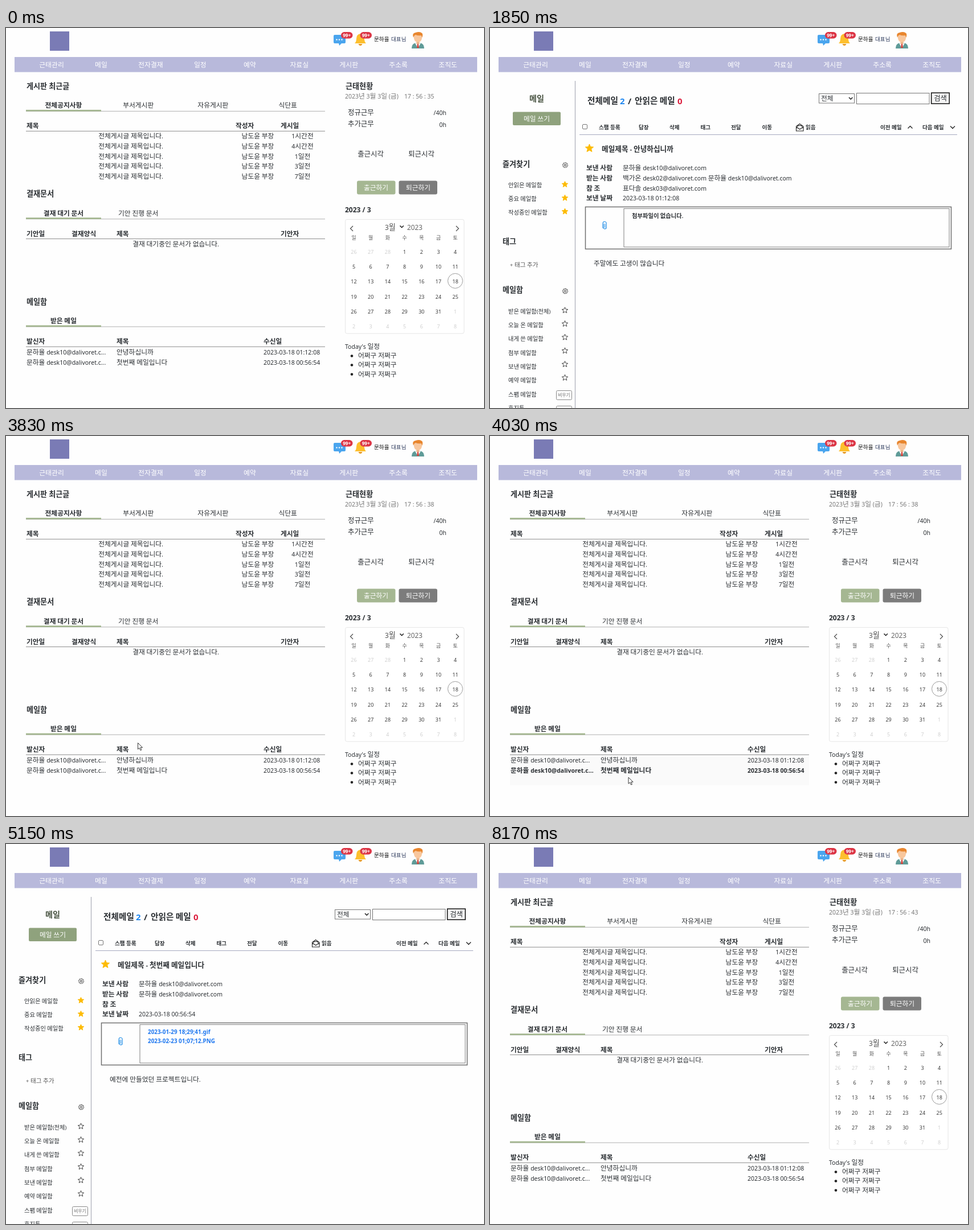
Animation of 839x668 px, one loop 9 s. Source, as an HTML page:

```html
<!DOCTYPE html>
<html lang="ko">
<head>
<meta charset="utf-8">
<title>그룹웨어 메일</title>
<style>
html, body { margin: 0; width: 100%; height: 100%; overflow: hidden; background: #fefefe; }
svg { display: block; width: 839px; height: 668px; }
text { font-family: "Noto Sans", "Noto Sans CJK KR", sans-serif; white-space: pre; }
</style>
</head>
<body>
<svg id="stage" viewBox="0 0 839 668" xmlns="http://www.w3.org/2000/svg"></svg>
<script>
const LOOP = 9000;
const INK = '#2b2f33', GREEN = '#a3b68f', GOLD = '#fdbb05';
const ME = '문하율', MAIL = 'desk10@dalivoret.com';
const stage = document.getElementById('stage');

// Hangul runs are set slightly larger than Latin ones
const hangul = s => s.replace(/[가-힣]+/g, m => `<tspan font-size="1.12em">${m}</tspan>`);

// Text with its vertical centre at y; o: s size, b weight, c colour, a anchor, id
function T(x, y, str, o = {}) {
  const s = o.s || 10.5;
  return `<text x="${x}" y="${y + s * 0.4}" font-size="${s}" font-weight="${o.b || 400}" ` +
    `fill="${o.c || INK}" text-anchor="${o.a || 'start'}"${o.id ? ` id="${o.id}"` : ''}>${hangul(str)}</text>`;
}
const M = (x, y, str, o) => T(x, y, str, { ...o, a: 'middle' });
const B = (x, y, str, o) => T(x, y, str, { ...o, b: 700 });
const rect = (x, y, w, h, fill, rx = 0, stroke = 'none', sw = 1) =>
  `<rect x="${x}" y="${y}" width="${w}" height="${h}" rx="${rx}" fill="${fill}" stroke="${stroke}" stroke-width="${sw}"/>`;
const path = (d, fill = 'none', stroke = 'none', sw = 1, extra = '') =>
  `<path d="${d}" fill="${fill}" stroke="${stroke}" stroke-width="${sw}" ${extra}/>`;
const circle = (x, y, r, fill = 'none', stroke = 'none', sw = 1) =>
  `<circle cx="${x}" cy="${y}" r="${r}" fill="${fill}" stroke="${stroke}" stroke-width="${sw}"/>`;
const rule = (y, c) => path(`M35 ${y}H560`, 'none', c);

function star(x, y, r, fill, stroke) {
  let d = '';
  for (let i = 0; i < 10; i++) {
    const a = Math.PI * (i / 5 - 0.5), q = i % 2 ? r * 0.45 : r;
    d += (i ? 'L' : 'M') + (x + q * Math.cos(a)).toFixed(2) + ' ' + (y + q * Math.sin(a)).toFixed(2);
  }
  return path(d + 'Z', fill, stroke, 1, 'stroke-linejoin="round"');
}
function gear(x, y) {
  let d = '';
  for (let i = 0; i < 32; i++) {
    const a = i * Math.PI / 16, r = i % 4 < 2 ? 4.6 : 3.8;
    d += (i ? 'L' : 'M') + (x + r * Math.cos(a)).toFixed(2) + ' ' + (y + r * Math.sin(a)).toFixed(2);
  }
  return path(d + 'Z', 'none', '#333') + circle(x, y, 1.7, 'none', '#333');
}
const badge = x => rect(x, 7, 20.5, 11.5, '#dc3545', 5.7) + M(x + 10.2, 12.8, '99+', { s: 8.2, b: 700, c: '#fff' });

function header() {
  const menu = ['근태관리', '메일', '전자결재', '일정', '예약', '자료실', '게시판', '주소록', '조직도'];
  return rect(77, 6, 34, 34, '#7a7bb5') +
    path('M577 12h17q2 0 2 2v11q0 2-2 2h-5l-4 4-1-4h-7q-2 0-2-2v-11q0-2 2-2z', '#4aa5ee') +
    [580.5, 585, 589.5].map(x => circle(x, 20.5, 1.2, '#fff')).join('') + badge(588) +
    path('M622 10q7 1 7 9 0 5 3 8h-20q3-3 3-8 0-8 7-9z', '#fdbf2d') +
    path('M618.500 28h7q-1 3-3.500 3t-3.500-3z', '#e8981d') + badge(621.5) +
    T(646, 20, ME, { s: 8.6, b: 500, c: '#111' }) + T(676, 20, '대표님', { s: 8.6, c: '#2d3a5c' }) +
    path('M712 36q0-8 6-9.500h10q6 1.500 6 9.500z', '#5f9b98') +
    path('M718 26.500h10l-5 9z', '#fff') + path('M722 28h2l1 7h-4z', '#d6453d') +
    rect(720.5, 21, 5, 7, '#eeb387') +
    path('M716 14q0-4 7-4t7 4v4q-1 7-7 7t-7-7z', '#f8c79d') +
    path('M715 17q-3-8 4-9 8-3 12 2 1 3-.500 7l-1.500-4q-6 1-10-1-3 1-4 5z', '#e8862e') +
    rect(15, 51, 812, 26.5, '#b8b9db') +
    menu.map((m, i) => M(80 + i * 86.95, 64.3, m, { c: '#fff', s: 10.6 })).join('');
}

// Tab strip whose first tab is active
const tabs = (y, names) => rule(y + 10.5, '#b0b0b0') + rect(35, y + 8, 132, 2.7, GREEN) +
  names.map((n, i) => M(101 + i * 131.2, y, n, { b: i ? 400 : 700 })).join('');
const heads = (y, cols) => cols.map(([x, n]) => B(x, y, n)).join('') + rule(y + 9.3, '#8c8c8c');

function calendar() {
  let s = rect(595.5, 336.5, 208.5, 200.5, '#fff', 3, '#e6e6e6') +
    path('M609 348l-4.500 4.500 4.500 4.500M790 348l4.500 4.500-4.500 4.500', 'none', '#444', 1.1) +
    T(665, 350, '3월', { s: 11.8, b: 300, c: '#555' }) + path('M691.500 347.500l3.200 3.200 3.200-3.200', 'none', '#222', 1.6) +
    T(704, 350, '2023', { s: 11.8, b: 300, c: '#666' });
  const colX = i => 610.5 + i * 29.7;
  [...'일월화수목금토'].forEach((d, i) => s += M(colX(i), 369, d, { s: 8, c: '#555' }));
  for (let i = 0; i < 42; i++) {
    const n = i - 2, inMonth = n > 0 && n < 32;
    const day = n < 1 ? n + 28 : n > 31 ? n - 31 : n;
    s += M(colX(i % 7), 393 + Math.floor(i / 7) * 26.3, '' + day, { s: 9, c: inMonth ? '#3c3c3c' : '#d0d0d0' });
  }
  return s + circle(788.5, 444.5, 13, 'none', '#999');
}

function row(y, id, title, date) {
  return `<g id="${id}">` + T(36, y, ME + ' ' + MAIL.slice(0, -2) + '...') + T(194, y, title) + T(452, y, date) + '</g>';
}
// Same row prepared in bold; only one of the two is shown
const boldRow = (...a) => row(...a).replace(/font-weight="400"/g, 'font-weight="600"');

function home() {
  const ages = ['1시간전', '4시간전', '1일전', '3일전', '7일전'];
  const mail1 = ['안녕하십니까', '2023-03-18 01:12:08'], mail2 = ['첫번째 메일입니다', '2023-03-18 00:56:54'];
  const big = { s: 11.7 }, mid = { s: 11.1, b: 500 };
  return B(36, 102, '게시판 최근글', big) + tabs(135.8, ['전체공지사항', '부서게시판', '자유게시판', '식단표']) +
    heads(172, [[36, '제목'], [403, '작성자'], [482, '게시일']]) +
    ages.map((a, i) => {
      const y = 190 + i * 17.65;
      return M(219, y, '전체게시글 제목입니다.') + M(442, y, '남도윤 부장') + M(520.5, y, a);
    }).join('') +
    B(36, 291.5, '결재문서', big) + tabs(325.3, ['결재 대기 문서', '기안 진행 문서']) +
    heads(361.3, [[36, '기안일'], [115, '결재양식'], [194, '제목'], [482, '기안자']]) +
    M(298, 380, '결재 대기중인 문서가 없습니다.') +
    B(36, 481, '메일함', big) + tabs(514.6, ['받은 메일']) +
    '<g id="panel">' + rect(35, 561, 525, 52.5, '#fafafa') + '</g>' +
    heads(551, [[36, '발신자'], [194, '제목'], [452, '수신일']]) +
    row(570, 'r1', ...mail1) + boldRow(570, 'b1', ...mail1) +
    row(588, 'r2', ...mail2) + boldRow(588, 'b2', ...mail2) +
    B(596, 102, '근태현황', big) + T(595, 120, '2023년 3월 3일 (금)', { c: '#777' }) +
    T(699, 120, '', { c: '#777', id: 'clock' }) +
    T(600, 148.7, '정규근무', mid) + T(773, 149, '/40h', { a: 'end' }) +
    T(600, 169, '추가근무', mid) + T(773, 169.5, '0h', { a: 'end' }) +
    M(640, 222, '출근시각', mid) + M(729, 222, '퇴근시각', mid) +
    rect(616, 268.5, 67.5, 24, '#a5b792', 3) + M(649.5, 281, '출근하기', { c: '#fff' }) +
    rect(689.5, 268.5, 67.5, 24, '#7c7c7c', 3) + M(723.5, 281, '퇴근하기', { c: '#fff' }) +
    B(595, 319.5, '2023 / 3', { s: 12 }) + calendar() +
    T(595, 560, "Today's 일정") +
    [576, 592, 608.3].map(y => circle(607, y + 0.5, 2.3, '#222') + T(618, y, '어쩌구 저쩌구')).join('');
}

function sidebar() {
  const fav = ['안읽은 메일함', '중요 메일함', '작성중인 메일함'];
  const boxes = ['받은 메일함(전체)', '오늘 온 메일함', '내게 쓴 메일함', '첨부 메일함', '보낸 메일함', '예약 메일함', '스팸 메일함', '휴지통'];
  const small = { s: 9.2 }, head = { s: 11.7, b: 600 };
  return path('M149.500 93V668', 'none', '#a9abb8', 1.2) +
    M(82, 124, '메일', { s: 12.6, b: 600, c: '#46513f' }) +
    rect(40, 147.5, 84, 23.5, '#8fa27d', 2) + M(82, 159.3, '메일 쓰기', { c: '#fff' }) +
    T(22, 239, '즐겨찾기', head) + gear(132, 241) +
    fav.map((n, i) => T(32, 276 + i * 24.4, n, small) + star(131.5, 275 + i * 23.8, 5.5, GOLD, GOLD)).join('') +
    T(22, 375, '태그', head) + T(35, 416, '+ 태그 추가', { s: 9.5, c: '#555' }) +
    T(22, 460, '메일함', head) + gear(132, 462.5) +
    boxes.map((n, i) => T(32, 498 + i * 24.35, n, small) +
      (i < 6 ? star(131.5, 496.3 + i * 23.7, 5.5, 'none', '#444') : '')).join('') +
    [637, 664].map(y => rect(116.5, y + 0.5, 27, 16, '#fff', 2, '#888') + M(130, y + 8.5, '비우기', { s: 6.8, c: '#666' })).join('');
}

function mailPage() {
  const tools = [[191, '스팸 등록'], [261, '답장'], [315, '삭제'], [369.5, '태그'], [423, '전달'], [477.5, '이동'],
    [554, '읽음'], [685, '이전 메일'], [759, '다음 메일']];
  const title = { s: 13.1 };
  return sidebar() +
    B(171, 128, '전체메일', title) + B(228, 128, '2', { s: 15, c: '#1f87f0' }) + B(242, 128, '/', { s: 15 }) +
    B(254, 128, '안읽은 메일', title) + B(329, 128, '0', { s: 15, c: '#dc1e3e' }) +
    rect(577.5, 115.5, 62, 16.5, '#fff', 0, '#767676') + T(581, 123.7, '전체') +
    path('M630 122l3.200 3.200 3.200-3.200', 'none', '#222', 1.6) +
    rect(643.5, 114.5, 127.5, 19, '#fff', 0, '#767676') +
    rect(774.7, 114, 31.5, 19, '#f5f5f5', 0, '#111', 1.5) + M(790.5, 123.7, '검색', { s: 11 }) +
    rect(162.5, 169.5, 8, 8, '#fff', 1.5, '#767676') +
    tools.map(([x, n]) => T(x, 174.5, n, { s: 8.6, b: 600 })).join('') +
    path('M537.500 173l6-4.500 6.500 4.500v8h-12.500zM537.500 174l6.200 4 6.300-4M540 174v-2.500h7.500v2.500', 'none', '#222', 1.1) +
    path('M733.500 176.500l4-4 4 4M808 172.500l4 4 4-4', 'none', '#222', 1.3) +
    path('M157 187.500H820', 'none', '#a5a9c0') +
    star(174.5, 211.5, 7.5, GOLD, GOLD) + B(196, 212, '', { s: 11.3, id: 'subject' }) +
    ['보낸 사람', '받는 사람', '참 조', '보낸 날짜'].map((n, i) =>
      B(169, 246 + i * 17.65, n) + T(233, 246 + i * 17.65, '', { id: 'v' + i })).join('') +
    rect(167.5, 314.5, 642, 74, '#fefefe', 0, '#707070', 1.5) +
    rect(235, 317.5, 571, 67.5, '#fefefe', 0, '#808080') +
    path('M199 344.500v6a2.600 2.600 0 0 0 5.200 0v-7a2 2 0 0 0-6-.500v8.500M201.600 344.500v6', 'none', '#2b93e8', 1.2, 'stroke-linecap="round"') +
    T(249, 330.3, '', { s: 9.2, b: 600, id: 'none' }) +
    B(249, 330, '', { s: 9.9, c: '#1f78f0', id: 'a0' }) + B(249, 346.5, '', { s: 9.9, c: '#1f78f0', id: 'a1' }) +
    T(182, 414, '', { id: 'body' });
}

stage.innerHTML = '<g>' + header() + '</g><g id="home">' + home() + '</g><g id="mail">' + mailPage() + '</g>' +
  '<g id="cursor">' + path('M0 0v11.200l2.600-2.300 1.900 4.200 1.900-.800-1.900-4.100h3.600z', '#fff', '#222', 0.9) + '</g>';

const $ = id => document.getElementById(id);
const show = (id, on) => $(id).setAttribute('display', on ? 'inline' : 'none');

const sender = ME + ' ' + MAIL;
const mails = [
  { subject: '메일제목 - 안녕하십니까', v0: sender, v1: '백가온 desk02@dalivoret.com ' + sender,
    v2: '표다솔 desk03@dalivoret.com', v3: '2023-03-18 01:12:08',
    none: '첨부파일이 없습니다.', a0: '', a1: '', body: '주말에도 고생이 많습니다' },
  { subject: '메일제목 - 첫번째 메일입니다', v0: sender, v1: sender, v2: '', v3: '2023-03-18 00:56:54',
    none: '', a0: '2023-01-29 18;29;41.gif', a1: '2023-02-23 01;07;12.PNG', body: '예전에 만들었던 프로젝트입니다.' }
];

// Pointer tracks: time, x, y; each ends at its last key
const tracks = [
  [[420, 395, 609], [520, 391, 590], [720, 387, 566], [1550, 387, 566], [1750, 300, 150], [1850, 300, 150]],
  [[3530, 190, 380], [3730, 222, 485], [3930, 241, 594], [4030, 243, 600], [4330, 243, 602],
    [4850, 243, 602], [5050, 190, 160], [5150, 190, 160]]
];
const ticks = [1030, 2030, 3030, 4130, 5130, 6130, 7130, 8170];

function pointer(t) {
  const k = tracks.find(k => t >= k[0][0] && t < k[k.length - 1][0]);
  if (!k) return null;
  const q = k[0][0] + Math.floor((t - k[0][0]) / 100) * 100;
  const i = k.findIndex((p, n) => q >= p[0] && q < k[n + 1][0]);
  const [a, b] = [k[i], k[i + 1]], f = (q - a[0]) / (b[0] - a[0]);
  return [a[1] + (b[1] - a[1]) * f, a[2] + (b[2] - a[2]) * f];
}

let openMail = -1;
function draw(t) {
  const cur = t >= 1450 && t < 3320 ? 0 : t >= 4750 && t < 7250 ? 1 : -1;
  show('home', cur < 0);
  show('mail', cur >= 0);
  if (cur >= 0 && cur !== openMail) {
    for (const id in mails[cur]) $(id).innerHTML = hangul(mails[cur][id]);
    openMail = cur;
  }
  $('clock').textContent = '17 : 56 : ' + (35 + ticks.filter(s => t >= s).length);

  const p = pointer(t), y = p ? p[1] : 0;
  show('cursor', p);
  if (p) $('cursor').setAttribute('transform', `translate(${p[0]} ${p[1]})`);
  const hover = y < 561 || y > 613 ? 0 : y < 579 ? 1 : 2;
  for (const n of [1, 2]) {
    show('r' + n, hover !== n);
    show('b' + n, hover === n);
  }
  show('panel', hover === 2 && t > 3000);
}

const start = performance.now();
function frame() {
  draw((performance.now() - start) % LOOP);
  requestAnimationFrame(frame);
}
frame();
</script>
</body>
</html>
```
